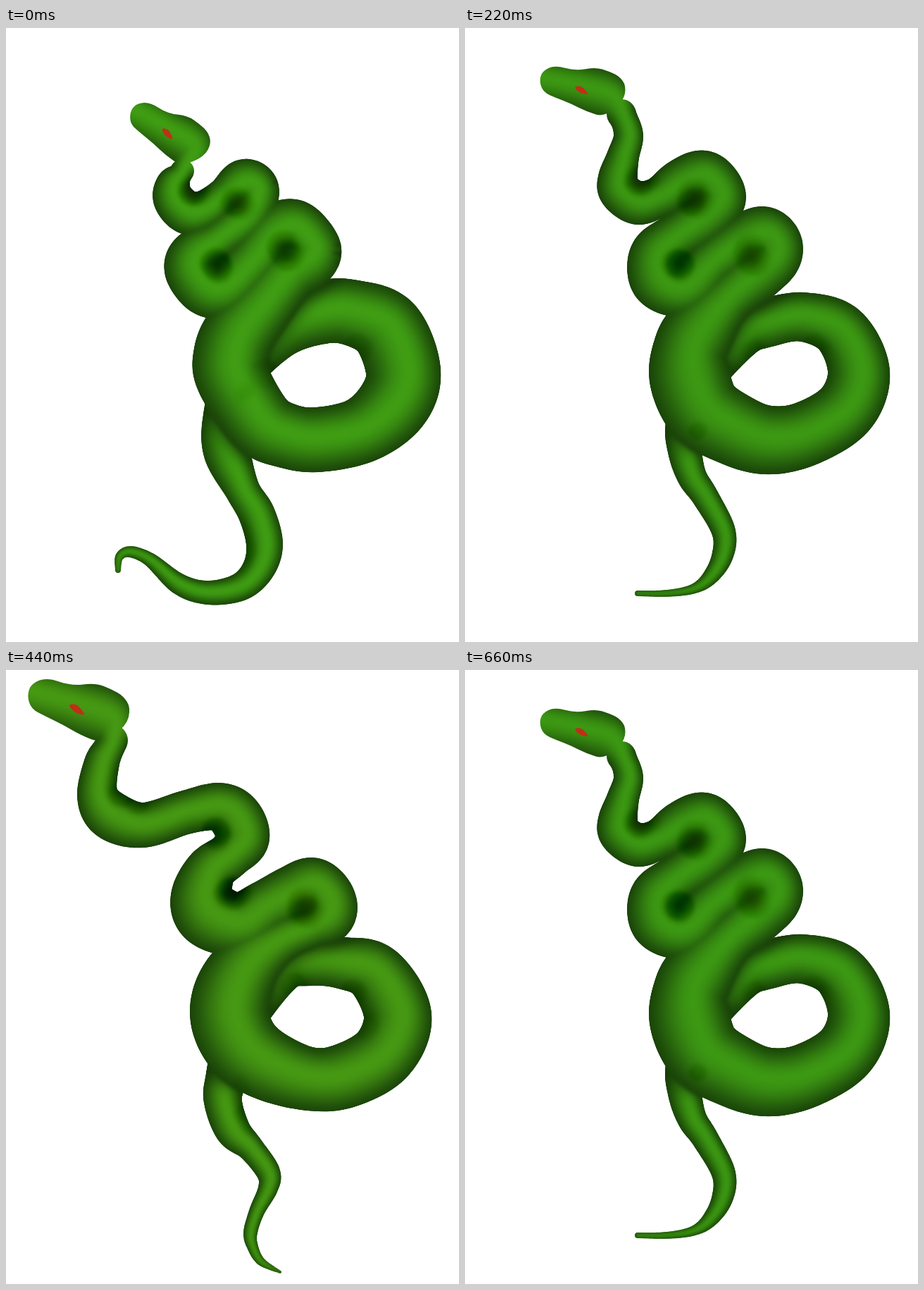
Animation, 643 px wide and 871 px high, one loop 880 ms. Source, as an HTML page with a canvas:

```html
<!DOCTYPE html>
<html lang="en">
<head>
<meta charset="utf-8">
<title>Snake</title>
<style>
html, body { margin: 0; width: 100%; height: 100%; overflow: hidden; background: #fff; }
canvas { display: block; width: 643px; height: 871px; }
</style>
</head>
<body>
<canvas id="stage" width="643" height="871"></canvas>
<script>
const W = 643, H = 871, STEP = 220, ORDER = [0, 1, 2, 1];
const RIM = [26, 67, 9], SHADOW = 'rgba(14,36,4,0.6)', SUN = [0.15, -0.1];

// Key points are x,y,radius. "under" runs from the tail tip round the ring, "over" from there to the neck.
const POSES = [
  {
    light: [64, 157, 20],
    head: { x: 178, y: 118, turn: 29, size: 1 },
    under: '159,769,4 161,750,6 176,743,8 204,754,10 246,789,15 287,801,17 332,793,20 358,768,23 367,733,26 356,690,26 335,654,25 313,600,33 308,550,28 325,500,30 385,428,42 450,403,45 496,405,47 541,427,52 564,487,53 550,533,52 506,570,47',
    over: '442,584,46 397,578,46 360,558,49 322,497,52 319,465,53 331,432,51 365,390,45 400,348,42 430,325,43 432,308,41 408,284,41 380,293,40 345,335,38 310,368,40 285,369,40 264,343,39 270,322,37 300,300,29 340,268,32 355,232,33 338,220,34 310,238,26 282,258,28 258,262,31 238,243,29 237,222,24 250,203,17'
  },
  {
    light: [61, 152, 20],
    head: { x: 107, y: 73, turn: 11.7, size: 1 },
    under: '245,802,4 285,802,5 323,796,7 347,780,11 365,750,15 367,714,17 341,665,19 322,636,21 312,600,24 310,560,25 335,500,30 390,433,36 428,418,35 480,410,35 533,430,40 559,488,44 539,542,45 480,577,46',
    over: '425,584,49 375,566,52 337,540,55 319,497,57 318,460,52 332,430,50 370,385,38 415,347,40 438,325,39 438,305,40 420,293,40 385,308,37 350,332,35 318,364,40 295,371,38 273,355,40 272,322,38 300,296,34 340,268,36 361,240,38 340,212,38 308,220,35 275,240,29 245,248,31 220,232,30 217,213,28 224,183,23 232,152,21 222,122,21'
  },
  {
    light: [71, 153, 20],
    head: { x: 32, y: 33, turn: 15.6, size: 1.2 },
    under: '389,854,2 362,839,6 350,818,8 347,798,10 356,768,11 372,735,14 372,712,17 347,678,19 322,653,25 308,612,27 312,580,29 330,510,30 388,425,35 430,412,36 480,416,37 525,431,43 556,490,48 535,545,47 480,576,46',
    over: '430,580,45 375,562,50 337,535,54 318,495,56 322,455,54 345,415,46 385,385,33 430,365,30 455,348,40 456,325,40 435,306,40 405,318,40 370,335,38 330,360,44 290,348,48 278,322,44 290,285,36 318,262,33 336,238,38 325,208,38 300,194,34 255,202,31 195,220,32 150,207,35 130,178,29 136,132,25 150,100,23'
  }
];

// Shared head, drawn from the snout at 0,0 with the neck to the right.
const HEAD = '0,-12 16,-24 46,-22 73,-33 93,-31 109,-27 121,-16 122,6 100,34 72,31 50,25 27,21 8,17 -1,3';
const EYE = '49,0 58,-3 66,2 72,7 62,8 54,5';
const SKULL = '100,4,36 55,0,36 5,0,34 -30,0,34';

const parse = s => s.split(' ').map(p => p.split(',').map(Number));
const mix = (a, b, k) => a.map((v, i) => Math.round(v + (b[i] - v) * k));

function place({ x, y, turn, size }, pts) {
  const a = turn * Math.PI / 180, c = Math.cos(a) * size, s = Math.sin(a) * size;
  return pts.map(([u, v, r]) => [x + c * u - s * v, y + s * u + c * v, r * size]);
}

function layer() {
  const c = document.createElement('canvas');
  c.width = W;
  c.height = H;
  return c.getContext('2d');
}

// Catmull-Rom samples about 3px apart; marks[i] is the index of key point i.
function sample(keys) {
  const pts = [], marks = [], last = keys.length - 1;
  for (let i = 0; i < last; i++) {
    const a = keys[Math.max(0, i - 1)], b = keys[i], c = keys[i + 1], d = keys[Math.min(last, i + 2)];
    const n = Math.ceil(Math.hypot(c[0] - b[0], c[1] - b[1]) / 3);
    marks.push(pts.length);
    for (let k = 0; k < n; k++) {
      const t = k / n;
      pts.push(b.map((v, j) => v + t / 2 * (c[j] - a[j]
        + t * (2 * a[j] - 5 * v + 4 * c[j] - d[j] + t * (3 * (v - c[j]) + d[j] - a[j])))));
    }
  }
  pts.push(keys[last]);
  return { pts, marks };
}

function disc(g, x, y, r) {
  g.beginPath();
  g.arc(x, y, Math.max(0.5, r), 0, 7);
  g.fill();
}

function fillShape(g, pts) {
  const mid = i => [0, 1].map(j => (pts[i][j] + pts[(i + 1) % pts.length][j]) / 2);
  g.beginPath();
  g.moveTo(...mid(pts.length - 1));
  pts.forEach((p, i) => g.quadraticCurveTo(p[0], p[1], ...mid(i)));
  g.fill();
}

// Nested ribbons, dark at the rim, with the bright ridge pulled towards the sun.
function tube(g, pts, from, to, light) {
  const levels = 28;
  for (let l = 0; l < levels; l++) {
    const t = l / (levels - 1);
    g.strokeStyle = `rgb(${mix(RIM, light, t * t * (3 - 2 * t) * 0.5 + Math.sin(t * Math.PI / 2) * 0.5)})`;
    for (let i = from; i < to; i++) {
      const [x, y, r] = pts[i], [u, v] = pts[i + 1];
      const d = Math.hypot(u - x, v - y) || 1, ex = (u - x) / d * 3, ey = (v - y) / d * 3;
      const sx = SUN[0] * r * t, sy = SUN[1] * r * t;
      g.lineWidth = Math.max(0.5, 2 * r * (1.04 - t));
      g.beginPath();
      g.moveTo(x - ex + sx, y - ey + sy);
      g.lineTo(u + ex + sx, v + ey + sy);
      g.stroke();
    }
  }
}

// The inside of each tight bend falls into shadow.
function pinch(g, pts, end) {
  const reach = 8;
  g.fillStyle = 'rgb(14,36,4)';
  g.filter = 'blur(6px)';
  for (let i = reach; i < end; i++) {
    const [x, y, r] = pts[i], a = pts[i - reach], b = pts[i + reach];
    const dx = (a[0] + b[0]) / 2 - x, dy = (a[1] + b[1]) / 2 - y, bend = Math.hypot(dx, dy);
    if (r < 22 || bend < r * 0.09) continue;
    g.globalAlpha = Math.min(0.06, (bend / r) ** 2 * 0.7);
    disc(g, x + dx / bend * r * 0.95, y + dy / bend * r * 0.95, r * 0.36);
  }
  g.globalAlpha = 1;
  g.filter = 'none';
}

function castShadow(g, pts, from, to) {
  const s = layer();
  for (const [x, y, r] of pts.slice(from, to)) disc(s, x, y, r + 8);
  s.globalCompositeOperation = 'source-in';
  s.fillStyle = SHADOW;
  s.fillRect(0, 0, W, H);
  g.filter = 'blur(9px)';
  g.drawImage(s.canvas, 0, 0);
  g.filter = 'none';
}

function paint({ light, head, under, over }) {
  const back = parse(under), body = [...back, ...parse(over)];
  const { pts, marks } = sample([...body, ...place(head, parse(SKULL))]);
  const join = marks[back.length], neck = marks[body.length - 1];

  const skin = layer();
  skin.fillStyle = `rgb(${RIM})`;
  skin.fillRect(0, 0, W, H);
  tube(skin, pts, 0, join, light);
  castShadow(skin, pts, marks[back.length + 2], neck);
  tube(skin, pts, join, pts.length - 1, light);
  pinch(skin, pts, neck);

  const g = layer();
  for (const p of pts.slice(0, neck + 1)) disc(g, ...p);
  fillShape(g, place(head, parse(HEAD)));
  g.globalCompositeOperation = 'source-atop';
  g.filter = 'blur(2.5px)';
  g.drawImage(skin.canvas, 0, 0);
  g.filter = 'blur(0.7px)';
  g.fillStyle = 'rgb(190,48,22)';
  fillShape(g, place(head, parse(EYE)));
  return g.canvas;
}

const pictures = POSES.map(paint);
const stage = document.getElementById('stage').getContext('2d');
const start = performance.now();

function draw() {
  const step = Math.floor((performance.now() - start) / STEP) % ORDER.length;
  stage.fillStyle = '#fff';
  stage.fillRect(0, 0, W, H);
  stage.drawImage(pictures[ORDER[step]], 0, 0);
  requestAnimationFrame(draw);
}
draw();
</script>
</body>
</html>
```
